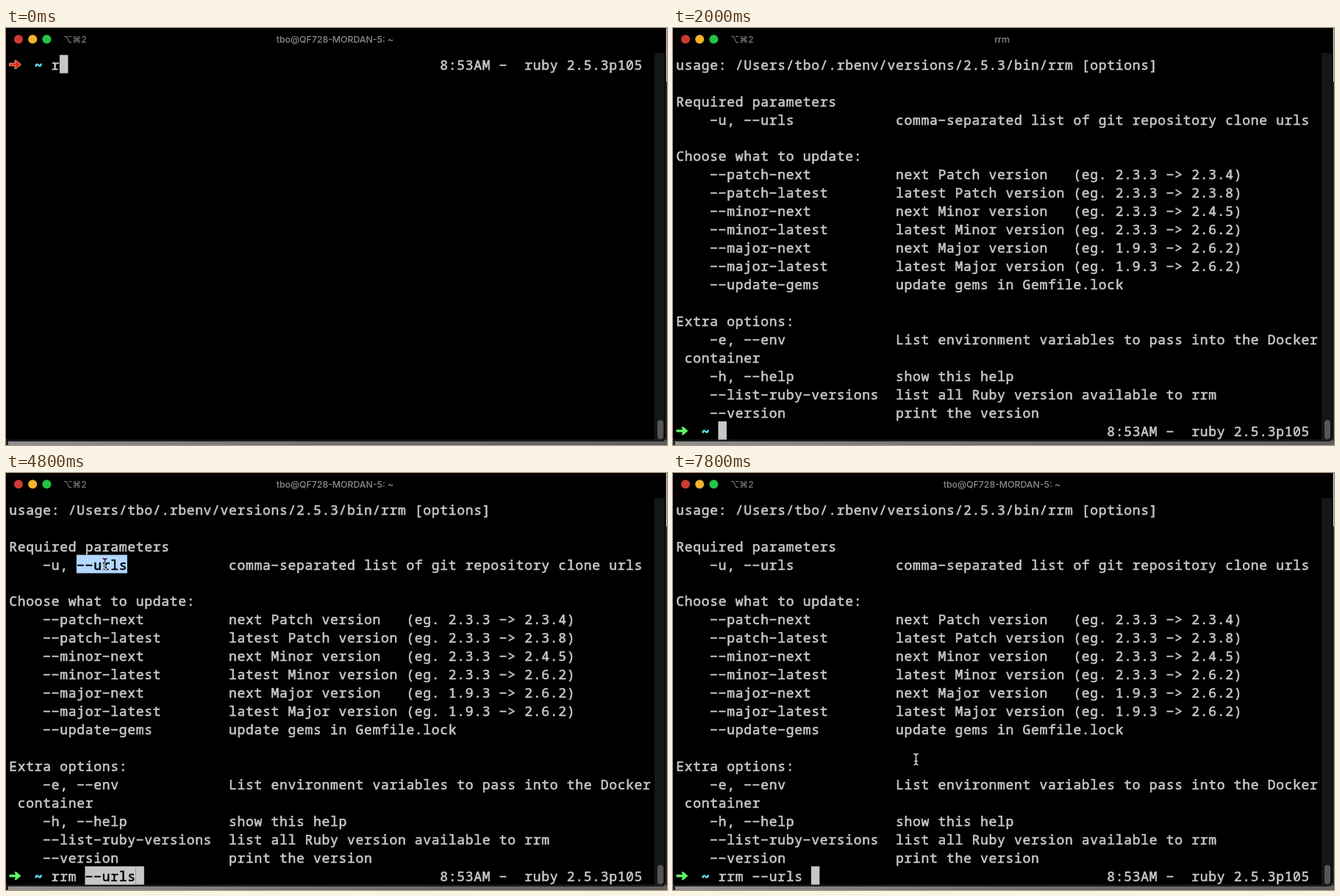
An HTML page with a canvas that plays this animation: 899 px wide and 568 px high, repeating every 8000 ms.

```html
<!DOCTYPE html>
<html lang="en">
<head>
<meta charset="utf-8">
<title>Terminal</title>
<style>
  html, body { margin: 0; width: 100%; height: 100%; overflow: hidden; background: #000; }
  canvas { display: block; }
</style>
</head>
<body>
<canvas id="stage" width="899" height="568"></canvas>
<script>
const ctx = document.getElementById('stage').getContext('2d');
const LOOP = 8000, STEP = 200;
const CELL_W = 11.49, CELL_H = 24.95, LEFT = 4, TOP = 36.7;
const INK = '#c7c7c7', SELECTED = '#b3d7ff';
const MONO = '18px "Noto Sans Mono", monospace';
const UI = '500 12.3px Inter, sans-serif';
const HOST = 'tbo@QF728-MORDAN-5: ~';
const CLOCK = '8:53AM -  ruby 2.5.3p105';
const HELP = `usage: /Users/tbo/.rbenv/versions/2.5.3/bin/rrm [options]

Required parameters
    -u, --urls            comma-separated list of git repository clone urls

Choose what to update:
    --patch-next          next Patch version   (eg. 2.3.3 -> 2.3.4)
    --patch-latest        latest Patch version (eg. 2.3.3 -> 2.3.8)
    --minor-next          next Minor version   (eg. 2.3.3 -> 2.4.5)
    --minor-latest        latest Minor version (eg. 2.3.3 -> 2.6.2)
    --major-next          next Major version   (eg. 1.9.3 -> 2.6.2)
    --major-latest        latest Major version (eg. 1.9.3 -> 2.6.2)
    --update-gems         update gems in Gemfile.lock

Extra options:
    -e, --env             List environment variables to pass into the Docker
 container
    -h, --help            show this help
    --list-ruby-versions  list all Ruby version available to rrm
    --version             print the version`.split('\n');

// Command line contents, each from its start time on
const TYPED = [
  [0, 'r'], [200, 'rr'], [400, 'rrm'], [2000, ''], [2600, 'r'], [2800, 'rr'],
  [3000, 'rrm'], [3200, 'rrm '], [4600, 'rrm --urls'], [5200, 'rrm --urls ']
];

const colX = col => LEFT + col * CELL_W;
const rowY = row => TOP + row * CELL_H;
const within = (t, from, to) => t >= from && t < to;

function box(x, y, w, h, color, radius = 0) {
  ctx.fillStyle = color;
  ctx.beginPath();
  ctx.roundRect(x, y, w, h, radius);
  ctx.fill();
}

function cells(row, col, count, color) {
  box(colX(col), rowY(row), count * CELL_W, CELL_H, color);
}

// One glyph per terminal cell, thickened by a stroke; hyphens use the wide minus glyph
function print(row, col, text, color = INK, weight = 0.6) {
  ctx.font = MONO;
  ctx.textAlign = 'center';
  ctx.fillStyle = ctx.strokeStyle = color;
  ctx.lineWidth = weight;
  ctx.lineJoin = 'round';
  [...text.replaceAll('-', '\u2212')].forEach((ch, i) => {
    if (ch === ' ') return;
    const x = colX(col + i + 0.5), y = rowY(row) + 20;
    ctx.fillText(ch, x, y);
    ctx.strokeText(ch, x, y);
  });
}

function label(text, x, align, color, font = UI) {
  ctx.font = font;
  ctx.textAlign = align;
  ctx.fillStyle = color;
  ctx.fillText(text, x, 20);
}

function arrow(row, ok) {
  const y = rowY(row) + 13;
  ctx.beginPath();
  [[4.5, -1.7], [13, -1.7], [11.5, -5.5], [14, -5.5], [20.5, 0],
   [14, 5.5], [11.5, 5.5], [13, 1.7], [4.5, 1.7]].forEach(([x, dy]) => ctx.lineTo(x, y + dy));
  ctx.closePath();
  ctx.fillStyle = ok ? '#5ff967' : '#d8301c';
  ctx.fill();
  if (!ok) {
    ctx.strokeStyle = '#f0987a';
    ctx.lineWidth = 1;
    ctx.stroke();
  }
}

function prompt(row, typed, ok) {
  arrow(row, ok);
  print(row, 3, '~', '#60d8ee', 1.4);
  print(row, 5, typed);
  print(row, 51, CLOCK);
}

function cursor(row, col, active) {
  if (active) return cells(row, col, 1, INK);
  ctx.strokeStyle = INK;
  ctx.lineWidth = 1;
  ctx.strokeRect(Math.round(colX(col)) + 0.5, Math.round(rowY(row)) - 0.5, 10.5, 24);
}

function pointer(x, y) {
  ctx.save();
  ctx.globalCompositeOperation = 'difference';
  ctx.strokeStyle = '#e8e8e8';
  ctx.lineWidth = 1.3;
  ctx.beginPath();
  for (const s of [-1, 1]) {
    ctx.moveTo(x - 3, y + s * 7.5);
    ctx.quadraticCurveTo(x, y + s * 7.5, x, y + s * 5);
    ctx.quadraticCurveTo(x, y + s * 7.5, x + 3, y + s * 7.5);
  }
  ctx.moveTo(x, y - 5);
  ctx.lineTo(x, y + 5);
  ctx.moveTo(x - 2, y + 2.5);
  ctx.lineTo(x + 2, y + 2.5);
  ctx.stroke();
  ctx.restore();
}

function movePointer(t) {
  if (within(t, 3400, 5200)) {
    const p = Math.min(1, (t - 3400) / 600), e = p * p * (3 - 2 * p);
    pointer(326 - 191.5 * e, 195 - 71 * e);
  } else if (t >= 7400) {
    pointer(330.5, 390);
  }
}

function chrome(t, active) {
  const desk = ctx.createLinearGradient(0, 0, 899, 0);
  desk.addColorStop(0, active ? '#909090' : '#c4c8c4');
  desk.addColorStop(0.5, active ? '#707070' : '#bcc0bc');
  desk.addColorStop(1, active ? '#606060' : '#b4b8b4');
  box(0, 0, 899, 568, desk);
  box(0, 561, 3, 7, active ? '#242424' : '#505050');
  box(897, 0, 2, 562, active ? '#292929' : '#4c4c4c');
  box(898, 0, 1, 73, active ? '#d0d0d0' : '#e0e0e0');
  box(0, 0, 897, 563, '#000', [0, 0, 5, 5]);
  box(4, 561, 889, 1, '#303030');
  box(882, 34, 14, 527, '#141617');
  box(886, 534, 8, 26, '#565656', 4);
  ['#cf3a32', '#f2b32d', '#25c346'].forEach((c, i) =>
    box(11 + i * 19.2, 9.3, 12, 12, active ? c : '#404040', 6));
  label('⌥⌘2', 78, 'left', active ? '#7c7c7c' : '#444', '500 12px Inter, "DejaVu Sans", sans-serif');
  label(within(t, 1400, 2200) ? 'rrm' : HOST, 447.5, 'center', active ? '#8c8c8c' : '#505050');
}

function draw(t) {
  const active = !within(t, 6000, 7200);
  const done = t >= 2000;
  const row = done ? HELP.length : 0;
  const typed = TYPED.findLast(([start]) => t >= start)[1];

  chrome(t, active);
  if (done) HELP.forEach((line, i) => print(i, 0, line));
  prompt(row, typed, done);

  if (within(t, 1000, 2000)) cursor(1, 0, active);
  else cursor(row, 5 + typed.length, active);

  if (within(t, 4200, 5200)) {
    cells(3, 8, 6, SELECTED);
    print(3, 8, '--urls', '#000');
  }
  if (within(t, 4600, 5200)) {
    cells(row, 9, 6, INK);
    print(row, 9, '--urls', '#000');
  }
  movePointer(t);
}

function tick() {
  draw(Math.floor(performance.now() % LOOP / STEP) * STEP);
  requestAnimationFrame(tick);
}
tick();
</script>
</body>
</html>
```
